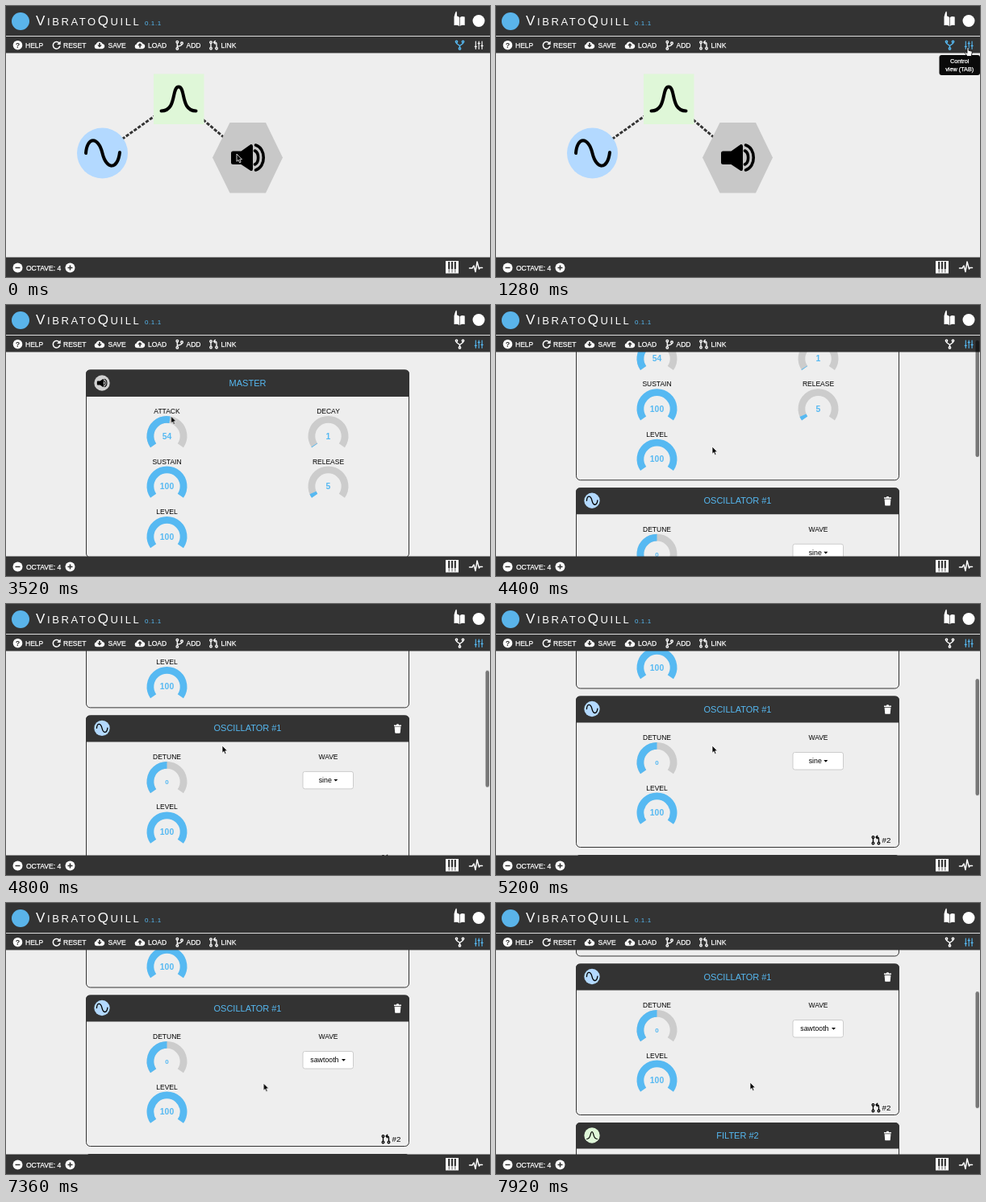
Write an HTML page that moves like this. It is 600 px wide and 337 px high and loops after 8 s.

```html
<!DOCTYPE html>
<html lang="en">
<head>
<meta charset="utf-8">
<title>VibratoQuill</title>
<style>
@property --scroll { syntax: "<number>"; inherits: true; initial-value: 0; }
@property --attack { syntax: "<integer>"; inherits: true; initial-value: 5; }

html, body { margin: 0; width: 100%; height: 100%; overflow: hidden; background: #eee; }
svg { display: block; }
#stage {
  width: 100vw; height: 100vh;
  --blue: #56b9f2; --dark: #333;
  font: 8.5px "Liberation Sans", Arial, sans-serif;
  animation: scroll 8s linear infinite, attack 8s linear infinite;
}

.bar text { fill: #fff; stroke: #fff; stroke-width: .25; }
.mid { text-anchor: middle; }
.head { font-size: 11px; fill: var(--blue); text-anchor: middle; }
.num { font-size: 10.4px; font-weight: bold; fill: var(--blue); text-anchor: middle; }
.small { font-size: 8px; }
.track { stroke: #ccc; }
.value { stroke: var(--blue); }
.attack { stroke-dasharray: calc(var(--attack) * 1px) 200px; }
.line { fill: none; stroke: currentColor; stroke-linecap: round; stroke-linejoin: round; }
.frame { fill: none; stroke: var(--dark); }

#page { transform: translateY(calc(var(--scroll) * -1px)); }
#thumb { transform: translateY(calc(var(--scroll) * .436px)); animation: thumb 8s linear infinite; }
#graph { animation: graph 8s step-end infinite; }
#controls { animation: controls 8s step-end infinite; }
#fork { animation: fork 8s step-end infinite; }
#sliders { animation: sliders 8s step-end infinite; }
#tip { animation: tip 8s linear infinite; }
#menu { animation: menu 8s step-end infinite; }
#hover { animation: hover 8s step-end infinite; }
#button { animation: button 8s step-end infinite; }
#before { animation: before 8s step-end infinite; }
#after { animation: after 8s step-end infinite; }
#cursor { animation: move 8s ease-in-out infinite; }
#arrow { animation: arrow 8s step-end infinite; }
#hand { animation: hand 8s step-end infinite; }

@keyframes scroll {
  0%, 50% { --scroll: 0; }
  55% { --scroll: 96; }
  59% { --scroll: 176; }
  62% { --scroll: 203; }
  64%, 94% { --scroll: 209; }
  97% { --scroll: 238; }
  99%, 100% { --scroll: 248; }
}
@keyframes attack {
  0%, 34% { --attack: 5; }
  43%, 100% { --attack: 54; }
}
@keyframes thumb {
  0%, 50% { opacity: 0; }
  50.5%, 69% { opacity: 1; }
  72%, 93.5% { opacity: 0; }
  94%, 100% { opacity: 1; }
}
@keyframes graph { 0% { visibility: visible; } 24%, 100% { visibility: hidden; } }
@keyframes controls { 0% { visibility: hidden; } 24%, 100% { visibility: visible; } }
@keyframes fork { 0% { color: var(--blue); } 24%, 100% { color: #fff; } }
@keyframes sliders { 0% { color: #fff; } 13%, 100% { color: var(--blue); } }
@keyframes tip {
  0%, 13% { opacity: 0; }
  15%, 25% { opacity: 1; }
  27%, 100% { opacity: 0; }
}
@keyframes menu { 0% { opacity: 0; } 75% { opacity: 1; } 86%, 100% { opacity: 0; } }
@keyframes hover {
  0% { opacity: 0; transform: translateY(-16.3px); }
  77% { opacity: 1; transform: translateY(-16.3px); }
  79%, 100% { opacity: 1; transform: none; }
}
@keyframes button {
  0% { fill: #fff; stroke: #ccc; }
  75% { fill: #d4d4d4; stroke: #8c8c8c; }
  86%, 100% { fill: #fff; stroke: #ccc; }
}
@keyframes before { 0% { opacity: 1; } 86%, 100% { opacity: 0; } }
@keyframes after { 0% { opacity: 0; } 86%, 100% { opacity: 1; } }
@keyframes arrow { 0% { opacity: 1; } 13% { opacity: 0; } 26%, 100% { opacity: 1; } }
@keyframes hand { 0% { opacity: 0; } 13% { opacity: 1; } 26%, 100% { opacity: 0; } }
@keyframes move {
  0%, 4% { transform: translate(286px, 184px); }
  13%, 25% { transform: translate(585px, 51px); }
  33%, 34% { transform: translate(180px, 172px); animation-timing-function: linear; }
  37% { transform: translate(177px, 157px); animation-timing-function: linear; }
  40% { transform: translate(188px, 143px); animation-timing-function: linear; }
  43%, 45% { transform: translate(204.5px, 138px); }
  49%, 68% { transform: translate(268px, 176px); }
  74%, 76% { transform: translate(402px, 196px); }
  80%, 87% { transform: translate(392px, 242px); }
  93%, 100% { transform: translate(315px, 223px); }
}
</style>
</head>
<body>
<svg id="stage" viewBox="0 0 600 337" preserveAspectRatio="none">
  <defs>
    <path id="arc" d="M-16.87 11.82A20.6 20.6 0 1 1 16.87 11.82" fill="none" stroke-width="8.75" pathLength="100"/>
    <path id="sine" class="line" stroke-width="4" d="M-20.5 0C-19-21-5-21 0 0S19 21 21.500 -1"/>
    <path id="bell" class="line" stroke-width="4" d="M-21.500 15C-2 15-9-15 0-15S2 15 21.500 15"/>
    <g id="speaker">
      <path d="M-18-8h10L4-16.500Q6.500-17 6.500-14V14Q6.500 17 4 16.500L-8 8.500H-18Q-20.500 8.500-20.500 6V-5.500Q-20.500-8-18-8Z"/>
      <path class="line" stroke-width="3.600" d="M9-8.500C14.500-6 14.500 6 9 8.500M10-15.500C23-12 23 12 10 15.500"/>
    </g>
    <g id="trash">
      <path d="M-4.500-4.500h2.800l.7-1.200h2l.7 1.200h2.800v1.500h-9zM-3.900-2.300h7.800l-.6 7.200q-.1.900-1 .9h-4.600q-.9 0-1-.9z"/>
    </g>
    <path id="cloud" fill="#fff" d="M-3.500 4.500A2.900 2.900 0 0 1-4.200-1.200A4.200 4.200 0 0 1 3.700-1.800A3.200 3.200 0 0 1 3.500 4.500Z"/>
    <g id="pull" class="line" stroke-width="1.300">
      <circle cx="-3.500" cy="-3.500" r="1.300"/><circle cx="-3.500" cy="4" r="1.300"/><circle cx="3.500" cy="4" r="1.300"/>
      <path d="M-3.500-2V2.500M3.500 2.500V-1.500Q3.500-3.500 1.500-3.500H.5M1.800-5.300L0-3.500 1.800-1.700"/>
    </g>
    <path id="caret" d="M0 0h5L2.500 2.700z"/>
  </defs>

  <rect width="600" height="337" fill="#eee"/>

  <g id="graph">
    <path d="M119.500 183L214 115.500L299.500 188.500" fill="none" stroke="#333" stroke-width="3" stroke-dasharray="4.200 1.800"/>
    <circle cx="119.500" cy="183" r="31.500" fill="#b3d9ff"/>
    <use href="#sine" x="119.500" y="183"/>
    <rect x="183" y="84.500" width="62.500" height="62.500" fill="#dff7d8"/>
    <use href="#bell" x="214" y="115.500"/>
    <path d="M277.500 145H322L343 188.500L322 232.500H277.500L256 188.500Z" fill="#c8c8c8"/>
    <use href="#speaker" x="299.500" y="188.500"/>
  </g>

  <g id="controls">
    <g id="page">
      <!-- master -->
      <rect class="frame" x="99.500" y="81" width="400" height="233" rx="5"/>
      <path d="M99 114V86q0-5.500 5.500-5.500h390q5.500 0 5.500 5.500v28z" fill="#333"/>
      <circle cx="119" cy="97" r="9.700" fill="#d0d0d0"/>
      <use href="#speaker" transform="translate(119 97) scale(.3)"/>
      <text class="head" x="299.500" y="101">MASTER</text>
      <g class="mid">
        <text x="199.500" y="135">ATTACK</text><text x="399.500" y="135">DECAY</text>
        <text x="199.500" y="197.500">SUSTAIN</text><text x="399.500" y="197.500">RELEASE</text>
        <text x="199.500" y="260">LEVEL</text>
      </g>
      <g transform="translate(199.500 163)">
        <use href="#arc" class="track"/><use href="#arc" class="value attack"/>
        <text class="num" id="count" y="3.500">5</text>
      </g>
      <g transform="translate(399.500 163)">
        <use href="#arc" class="track"/><use href="#arc" class="value" stroke-dasharray="1 200"/>
        <text class="num" y="3.500">1</text>
      </g>
      <g transform="translate(199.500 225.500)">
        <use href="#arc" class="value"/><text class="num" y="3.500">100</text>
      </g>
      <g transform="translate(399.500 225.500)">
        <use href="#arc" class="track"/><use href="#arc" class="value" stroke-dasharray="5 200"/>
        <text class="num" y="3.500">5</text>
      </g>
      <g transform="translate(199.500 288)">
        <use href="#arc" class="value"/><text class="num" y="3.500">100</text>
      </g>

      <!-- oscillator -->
      <rect class="frame" x="99.500" y="324" width="400" height="187.500" rx="5"/>
      <path d="M99 356.500V329q0-5.500 5.500-5.500h390q5.500 0 5.500 5.500v27.500z" fill="#333"/>
      <circle cx="119" cy="339.500" r="9.700" fill="#b3d9ff"/>
      <use href="#sine" transform="translate(119 339.500) scale(.32)"/>
      <text class="head" x="299.500" y="343.500">OSCILLATOR #1</text>
      <use href="#trash" x="485.500" y="340" fill="#fff"/>
      <g class="mid">
        <text x="199.500" y="378">DETUNE</text><text x="399.500" y="378">WAVE</text>
        <text x="199.500" y="440.500">LEVEL</text>
      </g>
      <g transform="translate(199.500 406)">
        <use href="#arc" class="track"/><use href="#arc" class="value" stroke-dasharray="50 200"/>
        <text class="num small" y="3">0</text>
      </g>
      <g transform="translate(199.500 468.500)">
        <use href="#arc" class="value"/><text class="num" y="3.500">100</text>
      </g>
      <use href="#pull" x="471" y="502.500"/>
      <text x="478.500" y="506" font-size="9.800">#2</text>

      <rect id="button" x="368" y="393.500" width="62.500" height="21.500" rx="2.500"/>
      <g font-size="8.800">
        <g id="before"><text x="387.700" y="407">sine</text><use href="#caret" x="406.300" y="403"/></g>
        <g id="after"><text x="377.300" y="407">sawtooth</text><use href="#caret" x="416" y="403"/></g>
        <g id="menu">
          <rect x="367.500" y="418.500" width="101.500" height="73" rx="3" fill="#000" opacity=".08"/>
          <rect x="367" y="417" width="102" height="73" rx="3" fill="#000" opacity=".08"/>
          <rect x="368" y="416.500" width="99.500" height="72.500" rx="2.500" fill="#fff" stroke="#ccc" stroke-width=".7"/>
          <rect id="hover" x="368.500" y="436" width="98.500" height="16.300" fill="#f4f4f4"/>
          <text x="381" y="431">square</text>
          <text x="381" y="447.300">sawtooth</text>
          <text x="381" y="463.600">triangle</text>
          <text x="381" y="479.900">custom</text>
        </g>
      </g>

      <!-- filter -->
      <rect class="frame" x="99.500" y="521.500" width="400" height="190" rx="5"/>
      <path d="M99 553.500V526.500q0-5.500 5.500-5.500h390q5.500 0 5.500 5.500v27z" fill="#333"/>
      <circle cx="119" cy="537" r="9.700" fill="#dff7d8"/>
      <use href="#bell" transform="translate(119 537) scale(.3)"/>
      <text class="head" x="299.500" y="541">FILTER #2</text>
      <use href="#trash" x="485.500" y="537.500" fill="#fff"/>
    </g>
  </g>

  <!-- header and toolbar -->
  <g class="bar" color="#fff">
    <rect width="600" height="58.500" fill="#333"/>
    <rect y="37" width="600" height="1" fill="#ddd"/>
    <circle cx="18" cy="19" r="11" fill="#5ab4ea"/>
    <text x="37" y="24" style="stroke:none;letter-spacing:2.600px" font-size="13"><tspan font-size="17">V</tspan>IBRATO<tspan font-size="17">Q</tspan>UILL</text>
    <text x="172" y="23.500" font-size="8" style="fill:var(--blue);stroke:none;letter-spacing:.6px">0.1.1</text>
    <path fill="#fff" d="M555.500 13.500Q559-.0 559 12.500Q561 12.700 562 14.200V25Q559.500 23.300 555.500 24zM568.700 13.500Q565 12 562.700 14.200V25Q565 23.300 568.700 24z"/>
    <circle cx="586" cy="18.500" r="7.500" fill="#fff"/>

    <circle cx="14.500" cy="48.700" r="5.800" fill="#fff"/>
    <text class="mid" x="14.500" y="52" font-size="9" font-weight="bold" style="fill:#333;stroke:none">?</text>
    <text x="24" y="51.800">HELP</text>

    <path class="line" stroke-width="1.500" d="M66 46.200A4.300 4.300 0 1 0 66.700 50.300"/>
    <path fill="#fff" d="M67.700 43.500V48H63.200z"/>
    <text x="71" y="51.800">RESET</text>

    <use href="#cloud" x="116" y="48.700"/>
    <path fill="#333" d="M115.200 46h1.700v2.500h2L116 51.700 113.200 48.500h2z"/>
    <text x="126.500" y="51.800">SAVE</text>

    <use href="#cloud" x="166" y="48.700"/>
    <path fill="#333" d="M165.200 51.700h1.700v-2.500h2L166 46 163.200 49.200h2z"/>
    <text x="176" y="51.800">LOAD</text>

    <g class="line" stroke-width="1.300">
      <circle cx="212.300" cy="44.700" r="1.300"/><circle cx="212.300" cy="53" r="1.300"/><circle cx="218" cy="46.300" r="1.300"/>
      <path d="M212.300 46.200V51.500M218 47.800Q217.800 49.500 212.500 50.200"/>
    </g>
    <text x="223.500" y="51.800">ADD</text>

    <use href="#pull" x="257.500" y="48.700"/>
    <text x="266.500" y="51.800">LINK</text>

    <g id="fork" class="line" stroke-width="1.400">
      <circle cx="558.500" cy="44.300" r="1.200"/><circle cx="566.500" cy="44.300" r="1.200"/><circle cx="562.500" cy="53" r="1.200"/>
      <path d="M558.500 45.700V46.500L562.500 49.500L566.500 46.500V45.700M562.500 49.500V51.600"/>
    </g>
    <g id="sliders" class="line" stroke-width="1.100">
      <path d="M582.300 44V53.500M586.200 44V53.500M590.100 44V53.500"/>
      <path stroke-width="1.600" d="M581.500 50.500h1.600M585.400 46.500h1.600M589.300 49.500h1.600"/>
    </g>
  </g>

  <!-- footer -->
  <g class="bar" color="#fff">
    <rect y="312.500" width="600" height="24.500" fill="#333"/>
    <circle cx="14.500" cy="325.500" r="6" fill="#fff"/>
    <circle cx="79.500" cy="325.500" r="6" fill="#fff"/>
    <path d="M11.500 325.500h6M76.500 325.500h6M79.500 322.500v6" stroke="#333" stroke-width="1.600"/>
    <text x="25" y="328.700">OCTAVE: 4</text>
    <rect x="545" y="317" width="16" height="15.500" fill="#fff"/>
    <path d="M549.200 318V327M553 318V327M556.800 318V327" stroke="#333" stroke-width="2.200"/>
    <path d="M549.200 327V331.500M553 327V331.500M556.800 327V331.500" stroke="#333" stroke-width=".8"/>
    <path class="line" stroke-width="1.500" d="M574.500 326h3.500l2-3 2 7.500 2-12.500 2.500 9 1-1.500h3"/>
  </g>

  <rect id="thumb" x="594.500" y="2" width="4.500" height="145" rx="2.250" fill="#000" fill-opacity=".5"/>

  <g id="tip" class="bar">
    <path d="M583 61.500L586 58.500L589 61.500z" fill="#0a0a0a"/>
    <rect x="549.500" y="61" width="50.500" height="25" rx="3" fill="#0a0a0a"/>
    <g class="mid" font-size="7.300"><text x="574.700" y="70.500">Control</text><text x="574.700" y="80.500">view (TAB)</text></g>
  </g>

  <g id="cursor" stroke="#fff" stroke-width=".8" stroke-linejoin="round">
    <path id="arrow" d="M0 0V9.300L2.100 7.400L3.500 10.800L5.100 10.100L3.700 6.800H6.500Z"/>
    <path id="hand" fill="#fff" stroke="#000" d="M-1 1Q0-.5 1 1V4.300L4.500 5.200Q5.500 5.600 5.200 7L4.200 11.500H-.8L-3.500 7.700Q-3.800 6.500-2.500 6.600L-1 7.700Z"/>
  </g>
</svg>
<script>
const stage = document.getElementById("stage");
const count = document.getElementById("count");
const style = getComputedStyle(stage);

// The number under the dial follows the animated property.
function tick() {
  count.textContent = style.getPropertyValue("--attack").trim();
  requestAnimationFrame(tick);
}
tick();
</script>
</body>
</html>
```
